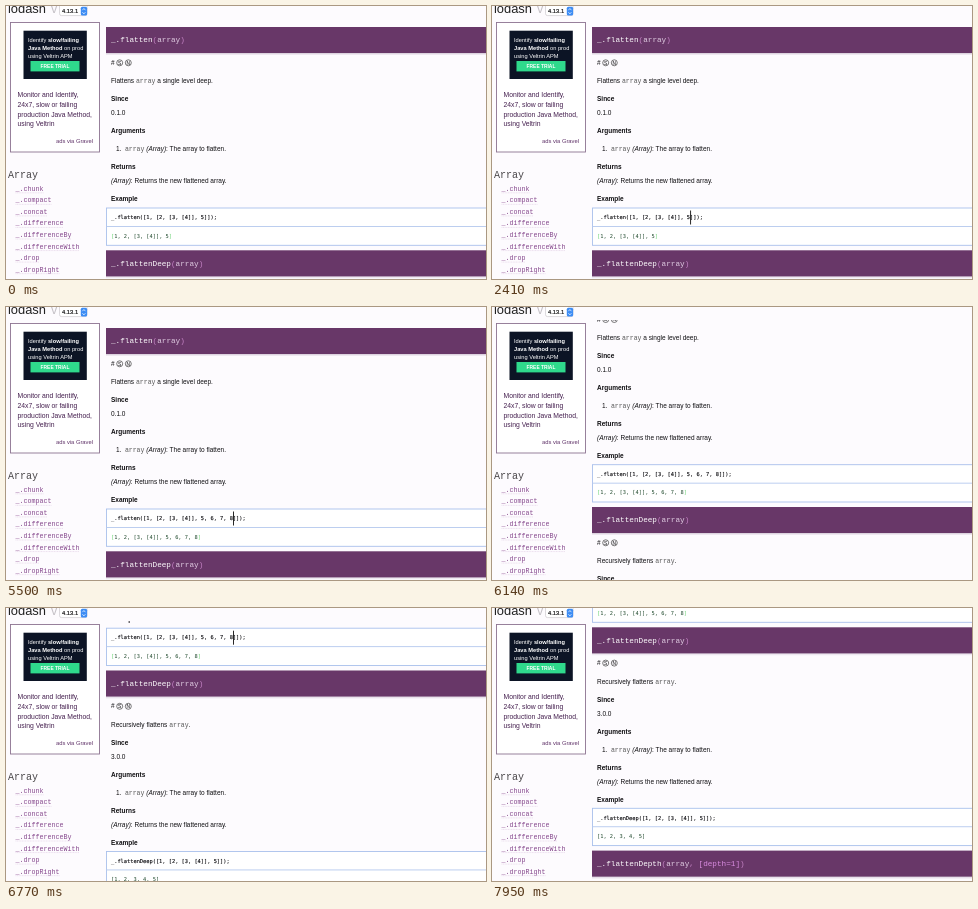
These frames come from a looping animation (480x273 px, 8000 ms). An HTML page:

```html
<!DOCTYPE html>
<html lang="en">
<head>
<meta charset="utf-8">
<title>Array docs</title>
<style>
  html, body { margin: 0; width: 100%; height: 100%; overflow: hidden; background: #fdfbfe; }
  svg { display: block; width: 480px; height: 273px; }
  text { white-space: pre; font: 6.5px "Liberation Sans", Arial, sans-serif; fill: #111013; }
  .b { font-weight: bold; }
  .i { font-style: italic; }
  .mono { font-family: "Liberation Mono", "Courier New", monospace; fill: #555; }
  .group { font-size: 10px; fill: #484548; }
  .link { font-size: 6.67px; fill: #85478c; }
  .head { font-size: 7.7px; fill: #fff; }
  .paren { fill: #c583c5; }
  .arg { fill: #e2cfe4; }
  .opt { fill: #d98be0; }
  .code { font: 5.33px "DejaVu Sans Mono", monospace; fill: #08080c; stroke: #08080c; stroke-width: .1; }
  .result { fill: #1d472a; stroke: none; }
  .edge { fill: #62cf6c; }
  .ad { font-size: 5.7px; fill: #fff; }
  .blurb { font-size: 6.8px; fill: #45204f; }
</style>
</head>
<body>
<svg id="stage" viewBox="0 0 480 273"></svg>
<script>
const LOOP = 8000;
const PITCH = 223.3;
const CHAR = 5.33 * 0.602;
const stage = document.getElementById("stage");

function add(parent, tag, attrs, html) {
  const el = document.createElementNS("http://www.w3.org/2000/svg", tag);
  for (const key in attrs) el.setAttribute(key, attrs[key]);
  if (html !== undefined) el.innerHTML = html;
  parent.append(el);
  return el;
}
const group = (parent, attrs = {}) => add(parent, "g", attrs);
const rect = (parent, x, y, width, height, fill, more) =>
  add(parent, "rect", { x, y, width, height, fill, ...more });
const text = (parent, x, y, html, cls = "", more) =>
  add(parent, "text", { x, y, class: cls, ...more }, html);
const span = (cls, s) => `<tspan class="${cls}">${s}</tspan>`;
const bracketed = s => span("edge", "[") + s + span("edge", "]");

rect(stage, 0, 0, 480, 273, "#fdfbfe");
const page = group(stage);
rect(stage, 95, 0, 385, 13, "#fdfbfe");
const embeds = group(stage); // code boxes ride above the top bar
const side = group(stage);

function header(top, name, args) {
  rect(page, 100, top + 25.5, 380, 2.5, "#eee8f0");
  rect(page, 100, top + 25.5, 380, 1.2, "#d6cad9");
  rect(page, 100, top, 380, 26, "#683768");
  text(page, 105, top + 15.3,
    "_." + name + span("paren", "(") + args + span("paren", ")"), "mono head");
}

function badge(x, y, letter) {
  add(page, "circle", { cx: x, cy: y, r: 3, fill: "none", stroke: "#222", "stroke-width": 0.6 });
  text(page, x, y + 1.75, letter, "", { "text-anchor": "middle", style: "font-size:4.8px" });
}

function section(top, name, intro, since) {
  const line = (x, y, html, cls) => text(page, x, top + y, html, cls);
  const type = span("i", "(Array)");
  header(top, name, span("arg", "array"));
  line(105, 38, "#");
  badge(113.7, top + 35.8, "S");
  badge(122.3, top + 35.8, "N");
  line(105, 56.2, intro);
  line(105, 74.2, "Since", "b");
  line(105, 88.2, since);
  line(105, 106.2, "Arguments", "b");
  line(110, 124.2, "1.");
  line(118.9, 124.2, `${span("mono", "array")} ${type}: The array to flatten.`);
  line(105, 142.2, "Returns", "b");
  line(105, 156.2, `${type}: Returns the new flattened array.`);
  line(105, 174.2, "Example", "b");
  rect(embeds, 100.5, top + 181, 390, 37.3, "#fff",
    { stroke: "#a9c0ec", "stroke-width": 0.9 });
  rect(embeds, 100, top + 199, 380, 0.9, "#b5c9ee");
  return {
    code: text(embeds, 105, top + 192.2, "", "code"),
    result: text(embeds, 105, top + 210.8, "", "code result")
  };
}

const array = span("mono", "array");
const live = section(21, "flatten", `Flattens ${array} a single level deep.`, "0.1.0");
const deep = section(21 + PITCH, "flattenDeep", `Recursively flattens ${array}.`, "3.0.0");
header(21 + 2 * PITCH, "flattenDepth",
  span("arg", "array") + span("paren", ", ") + span("opt", "[depth=1]"));
deep.code.textContent = "_.flattenDeep([1, [2, [3, [4]], 5]]);";
deep.result.textContent = "[1, 2, 3, 4, 5]";
const caret = rect(embeds, 0, 204.5, 0.9, 14, "#111");

function sidebar() {
  text(side, 2, 6.8, "lodash", "", { style: "font-size:12.9px;fill:#222" });
  text(side, 45, 6.8, "v", "", { style: "font-size:12.5px;fill:#c4c0c6" });
  rect(side, 53.5, -3, 27.5, 12.6, "#fff", { rx: 2, stroke: "#c4c2c6", "stroke-width": 0.6 });
  text(side, 56, 7.2, "4.13.1", "", { style: "font-size:5.8px;stroke:#222;stroke-width:.2" });
  rect(side, 74.8, 0.8, 6.3, 8.8, "#3c8cf4", { rx: 1.5 });
  add(side, "path", { d: "M76.4 4.2l1.5-1.7 1.5 1.7M76.4 6.2l1.5 1.7 1.5-1.7",
    fill: "none", stroke: "#fff", "stroke-width": 0.7 });

  rect(side, 4.5, 16.5, 89, 129.5, "#fff", { stroke: "#8d7391", "stroke-width": 0.9 });
  rect(side, 17.5, 24.7, 63.3, 48.3, "#0c1425");
  text(side, 22, 35.6, "Identify " + span("b", "slow/failing"), "ad");
  text(side, 22, 44, span("b", "Java Method") + " on prod", "ad");
  text(side, 22, 52, "using Veltrin APM", "ad");
  rect(side, 24.5, 55, 49, 10.4, "#2fd98c");
  text(side, 49, 62, "FREE TRIAL", "ad b", { "text-anchor": "middle", style: "font-size:4.9px" });
  ["Monitor and Identify,", "24x7, slow or failing", "production Java Method,", "using Veltrin"]
    .forEach((s, i) => text(side, 11.5, 91.2 + i * 9.7, s, "blurb"));
  text(side, 87, 137, "ads via Gravel", "", { "text-anchor": "end", style: "font-size:5.8px;fill:#5d2f66" });

  text(side, 2, 171.5, "Array", "mono group");
  ["chunk", "compact", "concat", "difference", "differenceBy", "differenceWith", "drop", "dropRight"]
    .forEach((name, i) => {
      const y = 184.8 + i * 11.55;
      text(side, 9.5, y, "_." + name, "mono link");
      add(side, "line", { x1: 9.5, x2: 9.5 + (name.length + 2) * 4, y1: y + 2, y2: y + 2,
        stroke: "#e0cce3", "stroke-width": 0.6, "stroke-dasharray": "1 .6" });
    });
}
sidebar();

const TYPED = ", 6, 7, 8";
const KEYS = [2600, 3050, 3420, 3850, 4200, 4400, 4680, 4860, 5480];
const FOCUS = 2410;
const BLINK = 530;

// time, offset, speed
const SCROLL = [
  [5850, 0, 0], [6140, 44, 0.3], [6500, 147, 0.2], [6770, 181.7, 0.11], [7230, 225, 0]
];

function scrollAt(t) {
  if (t <= SCROLL[0][0]) return 0;
  const i = SCROLL.findIndex(k => t < k[0]);
  if (i < 0) return SCROLL[SCROLL.length - 1][1];
  const [t0, y0, v0] = SCROLL[i - 1], [t1, y1, v1] = SCROLL[i];
  const d = t1 - t0, u = (t - t0) / d, w = 1 - u;
  return w * w * ((1 + 2 * u) * y0 + u * d * v0) + u * u * ((1 + 2 * w) * y1 - w * d * v1);
}

let shown = -1;
function showTyped(count) {
  if (count === shown) return;
  shown = count;
  const typed = TYPED.slice(0, count);
  const before = "_.flatten([1, [2, [3, [4]], 5" + typed;
  live.code.textContent = before + "]]);";
  live.result.innerHTML = bracketed("1, 2, [3, [4]], 5" + typed.replace(/, ?$/, ""));
  caret.setAttribute("x", 105 + before.length * CHAR + 0.1);
}

function draw(t) {
  const pressed = KEYS.filter(k => k <= t);
  showTyped(pressed.length);
  const active = pressed.length ? pressed[pressed.length - 1] : FOCUS;
  const lit = t >= FOCUS && Math.floor((t - active) / BLINK) % 2 === 0;
  caret.setAttribute("visibility", lit ? "visible" : "hidden");
  const move = `translate(0 ${-scrollAt(t)})`;
  page.setAttribute("transform", move);
  embeds.setAttribute("transform", move);
}

const start = performance.now();
function tick() {
  draw((performance.now() - start) % LOOP);
  requestAnimationFrame(tick);
}
tick();
</script>
</body>
</html>
```
